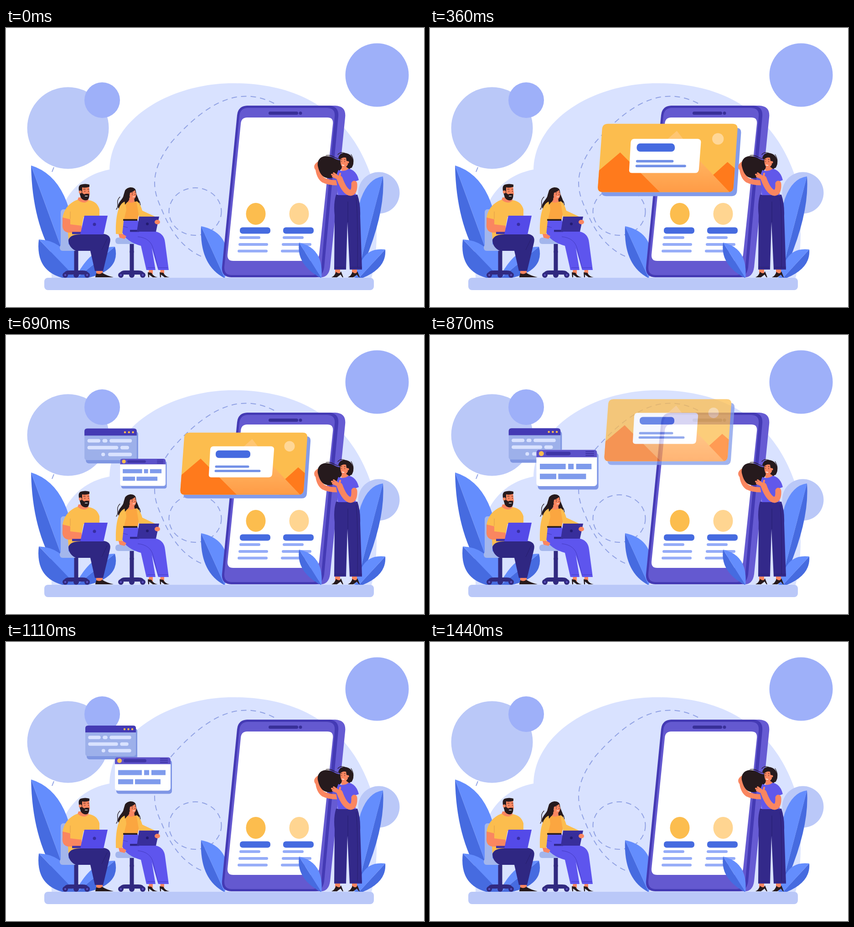
An HTML page for the animation above (2.07 s loop, 917 px wide and 611 px high).

```html
<!DOCTYPE html>
<html lang="en">
<head>
<meta charset="utf-8">
<title>Team presentation</title>
<style>
  html, body { margin: 0; width: 100%; height: 100%; overflow: hidden; background: #fff; }
  svg { display: block; width: 100vw; height: 100vh; }
  .skin { fill: #fa8660; } .limb { stroke: #fa8660; fill: none; stroke-linecap: round; stroke-linejoin: round; }
  .hair { fill: #261a1d; } .curl { fill: none; stroke: #261a1d; stroke-linecap: round; }
  .yellow { fill: #fcbd4e; } .chair { fill: #a3b6ec; } .metal { fill: #312a80; }
  .navy { fill: #2f2782; } .blue { fill: #466be0; } .pale { fill: #bac8f8; } .mid { fill: #9eb0f9; }
  .fold { fill: none; stroke: #251e68; stroke-width: .8; }
  .dash { fill: none; stroke: #91a2e4; stroke-width: 2; stroke-dasharray: 12 9; }
</style>
</head>
<body>
<svg viewBox="0 0 917 611" preserveAspectRatio="none">
  <defs>
    <path id="card" d="M403 217H651Q662 217 661 228L653 343Q652 353 642 353H392Q382 353 382.500 343L391 227Q392 217 403 217Z"/>
    <clipPath id="cardClip"><use href="#card"/></clipPath>
    <linearGradient id="hill" x1="0" y1="0" x2="0" y2="1">
      <stop offset=".1" stop-color="#ffc673"/><stop offset="1" stop-color="#ff9a45"/>
    </linearGradient>
    <g id="wheels" class="metal">
      <rect x="-4.500" width="9" height="46"/>
      <path d="M-27 52Q-27 43-14 43H14Q27 43 27 52Z"/>
      <circle cx="-24" cy="53" r="6"/><circle cy="53" r="6"/><circle cx="24" cy="53" r="6"/>
      <g fill="#6156c8"><circle cx="-24" cy="53" r="2"/><circle cx="24" cy="53" r="2"/></g>
    </g>
    <path id="heel" class="hair" d="M0 0L8 1Q13 10 22 11H11L3 5V11H1Z"/>
  </defs>

  <path fill="#d9e2ff" d="M498 121C640 121 750 180 800 322C816 400 818 485 802 547H100C95 440 120 330 227 310C229 200 360 121 498 121Z"/>
  <circle class="pale" cx="136" cy="219" r="89.500"/>
  <circle class="mid" cx="211" cy="158" r="39"/>
  <circle class="mid" cx="814" cy="103" r="69.500"/>
  <circle class="pale" cx="818" cy="361" r="45.500"/>
  <g class="dash">
    <path d="M588 165C515 128 445 157 363 250C310 320 325 360 341 396C362 448 390 485 433 502"/>
    <ellipse cx="415" cy="402" rx="57.500" ry="52"/>
    <path d="M105 305L101 315"/>
  </g>
  <g id="backLeaves"></g>

  <!-- phone -->
  <path fill="#665bd3" d="M530 170H722Q747 171 744 196L711 524Q708 546 690 546H495Z"/>
  <path fill="#443ab4" d="M529 170H710Q731 172 729 194L698 524Q695 546 676 546H494Q472 545 474 523L507 191Q509 171 529 170Z"/>
  <path fill="#6459d0" d="M529 175H705Q723 176 721 194L692 521Q689 541 672 541H495Q478 541 479 523L512 192Q514 176 529 175Z"/>
  <path fill="#fff" d="M529 196H705Q719 196 717 211L687 496Q685 510 671 510H498Q485 510 486 496L515 210Q516 196 529 196Z"/>
  <rect x="576" y="183" width="65" height="7" rx="3.500" fill="#382f98"/><circle cx="646" cy="186.500" r="3.500" fill="#382f98"/>
  <ellipse class="yellow" cx="548" cy="407" rx="21.500" ry="24"/><ellipse fill="#ffd591" cx="643" cy="407" rx="21.500" ry="24"/>
  <g id="profile">
    <rect class="blue" x="513" y="436.500" width="67" height="14" rx="6"/>
    <path stroke="#95acf8" stroke-width="6" stroke-linecap="round" d="M515 459H555M513 474H572M511 488.500H571"/>
  </g>
  <use href="#profile" x="95"/>
  <g id="frontLeaves"></g>
  <rect class="pale" x="84" y="547" width="723" height="27" rx="8"/>

  <!-- seated man -->
  <rect class="chair" x="120" y="397" width="17" height="86" rx="6"/>
  <use href="#wheels" x="154" y="488"/>
  <rect class="chair" x="118" y="474" width="68" height="14" rx="6"/>
  <path class="skin" d="M198 529H212V540H198Z"/>
  <path class="hair" d="M196 545L198 537Q206 541 211 536Q220 542 236 546H196Z"/>
  <path class="navy" d="M137 464Q142 451 164 451H214Q232 453 228 470L213 532H195L185 488H153Q137 480 137 464Z"/>
  <path class="fold" d="M210 486L222 461"/>
  <path class="skin" d="M159 371H181V383Q170 389 156 380Z"/>
  <path class="yellow" d="M124 416C127 396 140 382 157 376Q171 388 182 377Q200 380 205 397V414H170L163 452Q142 452 137 463L134 419Z"/>
  <path class="skin" d="M124 415L141 419V430L166 433V448H137Q122 446 124 428Z"/>
  <path class="fold" style="stroke:#d8964a" d="M141 418V402"/>
  <path class="skin" d="M164 347H182L184 364Q180 376 168 373Z"/>
  <path class="hair" d="M160 357Q158 345 164 343Q174 340 183 343V348Q173 351 167 349L167 361Q171 366 175 363H182Q184 373 178 377Q169 379 164 371Z"/>
  <circle class="skin" cx="163" cy="359" r="3.300"/>
  <path stroke="#fff" stroke-width="1.300" d="M173 368H179"/>
  <path class="curl" d="M170 353H174M179 353H182M173 357V358M181 357V358" stroke-width="1.200"/>
  <path fill="#3b31a6" d="M145 446.500H170V451.500H145Z"/>
  <path fill="#544ae8" d="M172 411H223L214 452H163Z"/>
  <circle fill="#372da2" cx="194" cy="430" r="3.500"/>

  <!-- seated woman -->
  <use href="#wheels" x="276" y="488"/><rect class="metal" x="271.500" y="472" width="9" height="20"/>
  <rect class="chair" x="240" y="459" width="58" height="14" rx="6"/>
  <path class="hair" d="M261 356C267 346 284 347 285 357C286 370 295 376 292 389L284 392L270 380L262 392C255 400 243 398 246 388C249 378 257 374 258 366Z"/>
  <path class="curl" stroke-width="1.300" d="M250 370C239 380 250 388 242 397M284 372Q297 380 294 390"/>
  <path class="skin" d="M314 528H322V539H312ZM339 528H347V539H338Z"/>
  <use href="#heel" x="311" y="535"/><use href="#heel" x="337" y="535"/>
  <path fill="#5e55ee" d="M255 419H288L299 443L329 446Q347 450 349 470L357 530H334L320 482L328 530H308L296 477Q264 468 255 448Z"/>
  <path class="fold" d="M289 457Q318 460 323 484L334 527M255 434L267 437M310 525H327M335 525H355" style="stroke:#3e35b5"/>
  <path fill="#fba640" d="M260 381L288 380L295 391L289 420H257Z"/>
  <path class="yellow" d="M262 380C247 383 240 410 241 451L255 452L258 423L264 398ZM286 379Q294 382 299 400L327 413L322 426L292 414Z"/>
  <path class="hair" d="M257 418.500H288V422H257Z"/>
  <path class="skin" d="M247 451H256L264 456L260 462L249 459ZM270 371H281L282 380Q274 385 267 380Z"/>
  <path class="skin" d="M271 357L283 355L286 364Q284 377 276 375Q268 370 271 357Z"/>
  <path class="hair" d="M284 354Q279 359 272 361L270 377L261 387L259 364L268 351Z"/>
  <path class="curl" stroke-width="1.100" d="M276 361H278M283 360H284M277 364V365M283 364V365"/>
  <path stroke="#fff" stroke-width="1.200" d="M278 370L283 369"/>
  <path fill="#30288b" d="M272 442H292V446.500H272Z"/>
  <path fill="#382e9b" d="M292 413H336L329 446H287Z"/>
  <circle fill="#221b70" cx="310" cy="429" r="3"/>
  <ellipse class="skin" cx="332" cy="425" rx="6" ry="5"/>

  <!-- banner -->
  <g id="banner">
    <use href="#card" x="7" y="8" fill="#829bea"/>
    <use href="#card" class="yellow"/>
    <g clip-path="url(#cardClip)">
      <path fill="#ff7a1c" d="M600 330L641 293L670 318V360H600Z"/>
      <path fill="url(#hill)" d="M540 231L588 293L648 356H400Z"/>
      <path fill="#ff7a1c" d="M375 318L427 274L509 356H375Z"/>
    </g>
    <circle fill="#ffd797" cx="622" cy="247" r="11.500"/>
    <path fill="#fff" d="M455 247H582Q589 248 588 255L584 308Q583 315 576 315H451Q444 315 445 308L448 254Q449 247 455 247Z"/>
    <rect class="blue" x="460" y="256" width="76" height="16.500" rx="7"/>
    <path stroke="#7290e7" stroke-width="5" stroke-linecap="round" d="M461 291.500H531M460 301H556"/>
  </g>

  <!-- floating windows -->
  <g id="codeWindow">
    <rect x="177" y="211" width="111" height="68" rx="6" fill="#7f96e2"/>
    <rect x="174" y="205" width="111" height="67" rx="5" fill="#9db0ea"/>
    <path fill="#443ab4" d="M174 220V211Q174 205 180 205H279Q285 205 285 211V220Z"/>
    <g class="yellow"><circle cx="260" cy="213" r="2.200"/><circle cx="268.500" cy="213" r="2.200"/><circle cx="277" cy="213" r="2.200"/></g>
    <path stroke="#d9e2ff" stroke-width="7.500" stroke-linecap="round" d="M184 231H204M216 231H219M231 231H271M184 245.500H242M254 245.500H265M213.500 260H214M228 260H271"/>
  </g>
  <g id="textWindow">
    <rect x="242" y="261" width="122" height="74" rx="6" fill="#7f96e6"/>
    <rect x="239" y="255" width="122" height="73" rx="6" fill="#fff"/>
    <path fill="#5c51c9" d="M239 270V261Q239 255 245 255H355Q361 255 361 261V270Z"/>
    <circle class="yellow" cx="249" cy="262.500" r="5"/>
    <rect x="258" y="259" width="50" height="7" rx="3.500" fill="#3f35a6"/>
    <path stroke="#3f35a6" stroke-width="2" d="M338 258.500H355M338 262.500H355M338 266.500H355"/>
    <path stroke="#7f9bec" stroke-width="11" d="M246 288.500H298M303 288.500H314M319 288.500H350M246 308.500H279M283 308.500H339"/>
  </g>

  <!-- presenter -->
  <path class="limb" stroke-width="11" d="M684 306Q686 326 696 333Q708 339 727 339"/>
  <path class="skin" d="M690 313L678 310Q673 301 681 295L685 292Q690 300 690 313Z"/>
  <path class="hair" d="M738 288C727 293 722 284 708 281C692 278 682 288 684 302C687 315 692 328 708 329C724 329 726 318 738 306Z"/>
  <path class="curl" stroke-width="1.200" d="M735 285C723 290 718 276 702 279M743 274Q734 270 728 277M757 277Q766 290 758 306"/>
  <path class="skin" d="M722 526H733V541H722ZM759 526H770V541H759Z"/>
  <path class="hair" id="shoe" d="M714 546Q721 543 724 534Q731 541 735 533L740 546H738L734 540L726 546Z"/><use href="#shoe" x="36"/>
  <path fill="#33298a" d="M724 365H771Q778 385 777 412L781 529H754L749 425L746 529H720L721 410Q718 385 724 365Z"/>
  <path class="fold" d="M750 380V425M768 372Q772 400 771 525M720 524H745M754 524H781"/>
  <path class="skin" d="M738 300H751V312Q744 318 735 311Z"/>
  <path fill="#6158ea" d="M729 311Q742 316 752 308Q769 312 774 333L758 339L768 366H728L726 342L723 327Z"/>
  <path class="hair" d="M729 284Q733 271 746 274Q760 277 762 292Q763 304 753 309L742 301Z"/>
  <path class="skin" d="M734 283Q742 279 748 284L750 299Q744 309 737 304Q732 296 734 283Z"/>
  <path class="hair" d="M731 285Q740 274 752 280L751 292L747 291L746 284Q739 282 734 287Z"/>
  <circle class="skin" cx="750" cy="294" r="2.500"/>
  <path class="curl" stroke-width="1" d="M735 288H737M742 288H744M736 292V293M743 292V293"/>
  <path stroke="#fff" stroke-width="1.300" d="M737 300L742 301"/>
  <path class="limb" stroke-width="13" d="M764 341Q765 360 756 361Q743 360 732 330"/>
  <path class="limb" stroke-width="4" d="M731 329L715 321M730 326L719 318M731 329L733 319M729 330L717 325"/>
</svg>
<script>
const LOOP = 2070, STEP = 30;
const $ = id => document.getElementById(id);
const clamp = v => Math.min(1, Math.max(0, v));

// Leaf: tip, base, then the control points of the dark and the light edge.
const leaf = ([x, y, bx, by, dx, dy, lx, ly]) =>
  `<path class="blue" d="M${x} ${y}Q${dx} ${dy} ${bx} ${by}Z"/>` +
  `<path fill="#648dfd" d="M${x} ${y}Q${lx} ${ly} ${bx} ${by}Z"/>`;
$('backLeaves').innerHTML = [
  [55, 301, 150, 560, 58, 470, 165, 335],
  [72, 463, 158, 552, 62, 548, 140, 466],
  [239, 479, 150, 552, 255, 540, 185, 478],
  [428, 434, 480, 548, 424, 520, 505, 450],
  [827, 325, 765, 560, 834, 418, 752, 335],
  [832, 485, 770, 552, 836, 530, 775, 478]
].map(leaf).join('');
$('frontLeaves').innerHTML = leaf([643, 470, 692, 548, 636, 519, 698, 482]);

// Each panel pops up past its size, settles, then floats up and fades.
const panels = [
  { id: 'banner', x: 525, y: 289, enter: 0, rise: 0, leave: 653, span: 320, lift: 100, fade: .57 },
  { id: 'codeWindow', x: 231, y: 242, enter: 410, rise: 85, leave: 1014, span: 370, lift: 140, fade: .68 },
  { id: 'textWindow', x: 301.5, y: 295, enter: 498, rise: 85, leave: 1070, span: 360, lift: 83, fade: .68 }
];
const GROW = 360, SETTLE = 180;

function place(p, time) {
  const grow = clamp((time - p.enter) / GROW);
  const settle = clamp((time - p.enter - GROW) / SETTLE);
  const out = clamp((time - p.leave) / p.span);
  const scale = 1.1 * Math.sin(grow * Math.PI / 2) - .1 * Math.sin(settle * Math.PI / 2);
  const dy = p.rise * (1 - grow) ** 3 - p.lift * (1 - Math.cos(out * Math.PI)) / 2;
  const el = $(p.id);
  el.setAttribute('transform', `translate(${p.x} ${p.y + dy}) scale(${scale}) translate(${-p.x} ${-p.y})`);
  el.setAttribute('opacity', clamp((1 - out) / (1 - p.fade)));
  el.setAttribute('visibility', scale > 0 && out < 1 ? 'visible' : 'hidden');
}

const start = performance.now();
function draw() {
  const elapsed = (performance.now() - start) % LOOP;
  const time = Math.floor(elapsed / STEP) * STEP;
  panels.forEach(p => place(p, time));
  requestAnimationFrame(draw);
}
draw();
</script>
</body>
</html>
```
